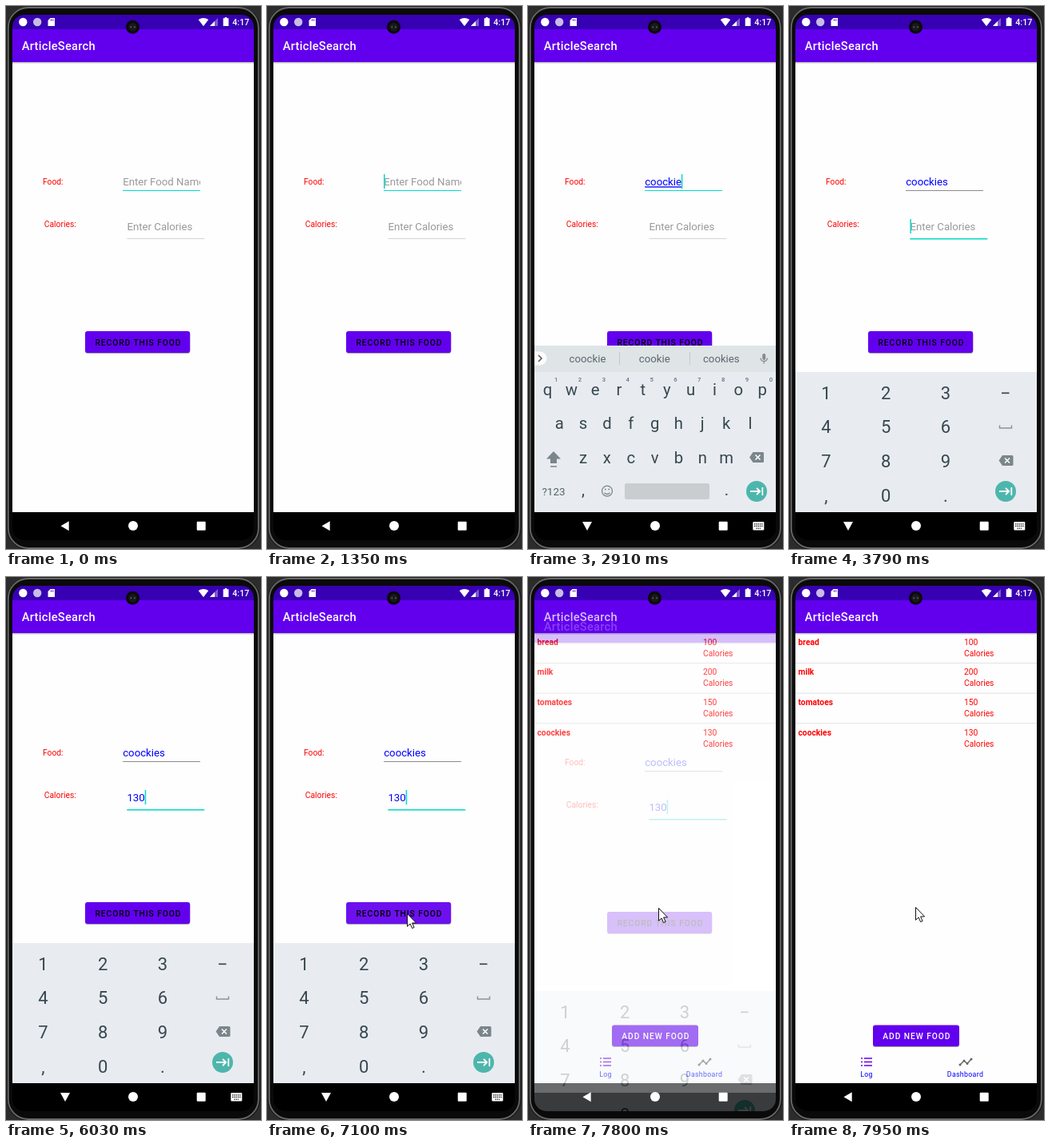
An HTML page for the animation above (8000 ms loop, 319 by 678 pixels).

```html
<!DOCTYPE html>
<html lang="en">
<head>
<meta charset="utf-8">
<title>Food log</title>
<style>
html, body { margin: 0; width: 100%; height: 100%; overflow: hidden; background: #2c2c2c; }
svg { display: block; width: 100vw; height: 100vh; font-family: Roboto, "Noto Sans", sans-serif; }
.label { font-size: 10.29px; fill: #f00; }
.bold { font-weight: 700; }
.input { font-size: 13.23px; fill: #00f; }
.hint { font-size: 13.23px; fill: #999; }
.button { font-size: 10.29px; font-weight: 500; letter-spacing: .92px; }
.raised { filter: drop-shadow(0 1.2px .7px rgba(0,0,0,.35)); }
.tab { font-size: 8.82px; letter-spacing: .3px; fill: #00f; text-anchor: middle; }
.key { font-size: 20.3px; fill: #37474f; text-anchor: middle; }
.digit { font-size: 22px; fill: #37474f; text-anchor: middle; }
.sup { font-size: 7.7px; fill: #67757c; text-anchor: middle; font-weight: 500; }
.word { font-size: 13.23px; fill: #5b676d; text-anchor: middle; }
.small { font-size: 13.5px; fill: #55636a; text-anchor: middle; }
</style>
</head>
<body>
<svg viewBox="0 0 319 678" preserveAspectRatio="none">
  <defs>
    <clipPath id="screen"><rect x="8" y="11" width="302" height="656" rx="15"/></clipPath>
    <clipPath id="page"><rect x="8" y="29" width="302" height="604"/></clipPath>
    <clipPath id="foodBox"><rect x="146" y="205" width="97" height="30"/></clipPath>
    <linearGradient id="shade" x2="0" y2="1">
      <stop stop-color="#000" stop-opacity=".3"/><stop offset="1" stop-color="#000" stop-opacity="0"/>
    </linearGradient>
    <g id="bar">
      <rect x="8" y="29" width="302" height="603" fill="#fefefe"/>
      <rect x="8" y="70" width="302" height="2.5" fill="url(#shade)"/>
      <rect x="8" y="29" width="302" height="41" fill="#6200ee"/>
      <text x="19.8" y="55" font-size="14.7" font-weight="500" letter-spacing=".25" fill="#fff">ArticleSearch</text>
    </g>
    <g id="erase">
      <path d="M-9 0L-4.5-6.5H7.5Q9-6.5 9-5V5Q9 6.5 7.5 6.5H-4.5Z" fill="#7b868c"/>
      <path d="M-1.5-3L4.5 3M4.5-3L-1.5 3" stroke="#fff" stroke-width="1.5"/>
    </g>
    <g id="next">
      <circle r="13" fill="#4db6ac"/>
      <path d="M-8 0H4M0-4.2L4.2 0L0 4.2M7.3-5V5" fill="none" stroke="#fff" stroke-width="1.8"/>
    </g>
  </defs>

  <!-- phone body -->
  <rect x=".5" y=".5" width="318" height="679" rx="28" fill="#1c1c1c"/>
  <rect x="2.8" y="2" width="313" height="675" rx="25" fill="#0a0a0a" stroke="#686868" stroke-width="1.8"/>

  <g clip-path="url(#screen)">
    <rect x="8" y="11" width="302" height="656"/>
    <rect x="8" y="11" width="302" height="22" fill="#3700b3"/>

    <g id="list" clip-path="url(#page)">
      <use href="#bar"/>
      <g id="rows"></g>
      <rect class="raised" x="105" y="559.5" width="108" height="26.5" rx="3" fill="#6200ee"/>
      <text class="button" x="117.3" y="576.8" fill="#fff">ADD NEW FOOD</text>
      <path d="M90 601H92M90 605.5H92M90 610H92M94 601H104M94 605.5H104M94 610H104" stroke="#6200ee" stroke-width="1.6"/>
      <path d="M214 609L219 604L223 607.5L228 602" fill="none" stroke="#666" stroke-width="1.5"/>
      <path d="M214 609h0M219 604h0M223 607.5h0M228 602h0" stroke="#666" stroke-width="3" stroke-linecap="round"/>
      <text class="tab" x="97" y="624.3">Log</text>
      <text class="tab" x="220.5" y="624.3">Dashboard</text>
    </g>

    <g id="form">
      <use href="#bar"/>
      <text class="label" x="46" y="222.6">Food:</text>
      <text class="label" x="47.8" y="275.6">Calories:</text>
      <text class="hint" id="foodHint" x="146.2" y="224.3" clip-path="url(#foodBox)">Enter Food Name</text>
      <text class="input" id="food" x="146.2" y="224.3"></text>
      <rect id="foodLine" x="146" y="230" width="97"/>
      <text class="hint" id="calHint" x="151.4" y="280.3">Enter Calories</text>
      <text class="input" id="cal" x="151.4" y="280.3"></text>
      <rect id="calLine" x="151.3" y="290" width="97"/>
      <rect id="caret" width="1.5" height="18" fill="#03dac5"/>
      <rect class="raised" id="record" x="99" y="406" width="131.2" height="27" rx="3"/>
      <text class="button" x="111.5" y="423.6">RECORD THIS FOOD</text>
    </g>

    <g id="letters">
      <rect x="8" y="424" width="302" height="208" fill="#e8ecf0"/>
      <rect x="8" y="424" width="302" height="33" fill="#dfe4e7"/>
      <path d="M8 431.5H15A8.5 8.5 0 0 1 15 448.5H8Z" fill="#fcfcfc"/>
      <path d="M13 436L17 440L13 444" fill="none" stroke="#555" stroke-width="1.5"/>
      <path d="M114.5 432V448M202.5 432V448" stroke="#c3c9cd"/>
      <text class="word" x="74.5" y="444.6"></text>
      <text class="word" x="158.3" y="444.6"></text>
      <text class="word" x="241.8" y="444.6"></text>
      <rect x="293.2" y="434" width="4" height="8" rx="2" fill="#838c91"/>
      <path d="M291 439.5A4.2 4.2 0 0 0 299.4 439.5M295.2 443.5V446.5" fill="none" stroke="#838c91" stroke-width="1.3"/>
      <path d="M32 556L41 565.5H36V571H28V565.5H23Z" fill="#7b868c"/>
      <path d="M28 575H36" stroke="#7b868c" stroke-width="1.5"/>
      <use href="#erase" x="286" y="563.5"/>
      <text class="small" x="32" y="610.7">?123</text>
      <text class="key" x="69" y="611">,</text>
      <g fill="none" stroke="#7b868c" stroke-width="1.3">
        <circle cx="99" cy="605.7" r="6.5"/><path d="M95.5 607.7Q99 611.2 102.5 607.7"/>
        <path d="M96.8 603.5h.01M101.2 603.5h.01" stroke-width="1.8" stroke-linecap="round"/>
      </g>
      <rect x="121" y="596" width="106" height="20" rx="2.5" fill="#cacdd0"/>
      <text class="key" x="248.5" y="611">.</text>
      <use href="#next" x="286" y="606"/>
    </g>

    <g id="numbers">
      <rect x="8" y="457" width="302" height="175" fill="#e8ecf0"/>
      <path d="M266 483.3H275.5" stroke="#37474f" stroke-width="1.7"/>
      <path d="M263.5 523.5V527H278.5V523.5" fill="none" stroke="#8b959a" stroke-width="1.5"/>
      <use href="#erase" x="271.5" y="567.5"/>
      <use href="#next" x="271" y="606"/>
    </g>

    <!-- navigation -->
    <g fill="#fff">
      <path id="back" d="M68.5 649.3L78.7 643.3V655.3Z"/>
      <path id="down" d="M68 644H80L74 655Z"/>
      <circle cx="159" cy="649" r="6"/>
      <rect x="238.7" y="643.8" width="11" height="11" rx="1"/>
      <g id="switcher">
        <rect x="281.3" y="644" width="14" height="10.5" rx="1"/>
        <path d="M283 646.8H294M283 649.3H294M285.5 652.2H291" stroke="#000" stroke-width="1.2" stroke-dasharray="1.3 1" fill="none"/>
      </g>
    </g>

    <!-- status bar -->
    <g fill="#fff">
      <circle cx="21.3" cy="20" r="5.2"/>
      <circle cx="39.2" cy="20" r="5.2" fill="#c9bce8"/>
      <path d="M55.5 15H61V25H52.5V18Z"/>
      <path d="M56 16.5V18.5M57.6 16.5V18.5M59.2 16.5V18.5" stroke="#3700b3" stroke-width=".8"/>
      <path d="M240.7 17Q247 12.8 253.3 17L247 25.2Z"/>
      <path d="M265 15V25H255Z" opacity=".35"/><path d="M261 19V25H255Z"/>
      <path d="M273.8 14H276.2V15.2H278.5V25H271.7V15.2H273.8Z"/>
      <text x="283.3" y="24" font-size="10.7" font-weight="500">4:17</text>
    </g>
  </g>

  <circle cx="158.5" cy="26.3" r="8.5" fill="#0b0b0d"/>
  <circle cx="158.5" cy="26.3" r="5.2" fill="#19191c"/>
  <circle cx="156.3" cy="26.3" r="1.1" fill="#55555a"/><circle cx="160.9" cy="26.3" r="1.1" fill="#55555a"/>

  <path id="mouse" d="M.5.5V16.3L4.1 13L6.6 18.6L9.1 17.5L6.6 12H11.6Z" fill="#fff" stroke="#111"/>
</svg>

<script>
const LOOP = 8000;
const $ = id => document.getElementById(id);
const words = document.querySelectorAll('.word');
const fields = {
  food: { x: 146, y: 210, idle: '#8c8c8c', weight: 1 },
  cal: { x: 151.4, y: 266, idle: '#d4d4d4', weight: 1.5 }
};

function add(parent, tag, attrs, text = '') {
  const el = document.createElementNS('http://www.w3.org/2000/svg', tag);
  for (const k in attrs) el.setAttribute(k, attrs[k]);
  el.textContent = text;
  $(parent).append(el);
}

[['qwertyuiop', 24.5], ['asdfghjkl', 39.2], ['zxcvbnm', 69]].forEach(([row, x], r) => {
  [...row].forEach((ch, i) => {
    const cx = x + i * 29.85;
    add('letters', 'text', { class: 'key', x: cx, y: 485.5 + r * 42.5 }, ch);
    if (!r) add('letters', 'text', { class: 'sup', x: cx + 10.7, y: 469.3 }, (i + 1) % 10);
  });
});

['123', '456', '789', ',0.'].forEach((row, r) => [...row].forEach((ch, i) =>
  add('numbers', 'text', { class: 'digit', x: 46.4 + i * 74.8, y: 490.8 + r * 42.6 }, ch)));

[['bread', 100], ['milk', 200], ['tomatoes', 150], ['coockies', 130]].forEach(([name, kcal], i) => {
  const y = 84.7 + i * 37.6;
  add('rows', 'text', { class: 'label bold', x: 11.5, y }, name);
  add('rows', 'text', { class: 'label', x: 219, y }, kcal);
  add('rows', 'text', { class: 'label', x: 219, y: y + 14 }, 'Calories');
  if (i < 3) add('rows', 'rect', { x: 8, y: y + 22.3, width: 302, height: 1, fill: '#e2e2e2' });
});

// Each step lists only what changes from the one before.
const steps = [
  [0, { food: '', cal: '', field: 'food', caret: 0, composing: 0, pad: '', rise: 0, solid: 1, words: '',
        keys: 0, mouse: null, tint: '#6200ee', formY: 0, form: 1, list: 0 }],
  [390, { caret: 1 }],
  [980, { caret: 0 }],
  [1350, { caret: 1 }],
  [1780, { food: 'coo', composing: 1, pad: 'letters', keys: 1, rise: 24, solid: .35 }],
  [1900, { food: 'cooc', rise: 13, solid: .8, words: 'cooc cool coocoo' }],
  [2050, { food: 'coock', rise: 0, solid: 1, words: 'coock cook coocoo' }],
  [2610, { food: 'coocki', words: 'coocki cookie cooking' }],
  [2910, { food: 'coockie', words: 'coockie cookie cookies' }],
  [3060, { food: 'coockies', words: "coockies cookies cookie's" }],
  [3490, { caret: 0 }],
  [3790, { field: 'cal', caret: 1, composing: 0, pad: 'numbers' }],
  [4220, { caret: 0 }],
  [4810, { caret: 1 }],
  [5330, { caret: 0 }],
  [5480, { cal: '1', caret: 1 }],
  [5630, { cal: '13' }],
  [6030, { cal: '130' }],
  [6430, { caret: 0 }],
  [6700, { mouse: [213, 458] }],
  [6820, { mouse: [172, 422] }],
  [6970, { mouse: [175, 420], caret: 1 }],
  [7100, { tint: '#6c10ef' }],
  [7380, { mouse: [176, 417], tint: '#7420f0' }],
  [7530, { tint: '#6a0cef' }],
  [7680, { formY: 1, keys: 0, rise: 1 }],
  [7800, { formY: 12, form: .25, list: 1, rise: 60, solid: .25, mouse: [163, 413] }],
  [7950, { form: 0, pad: '', mouse: [158, 412] }]
];
let last = {};
const states = steps.map(([at, change]) => [at, last = { ...last, ...change }]);

const show = (id, on) => $(id).setAttribute('visibility', on ? 'visible' : 'hidden');
const move = (id, x, y) => $(id).setAttribute('transform', `translate(${x} ${y})`);

function drawField(id, s) {
  const { idle, weight } = fields[id];
  const focused = s.field === id;
  $(id).textContent = s[id];
  show(id + 'Hint', !s[id]);
  $(id + 'Line').setAttribute('fill', focused ? '#03dac5' : idle);
  $(id + 'Line').setAttribute('height', focused ? weight : 1);
}

function draw(s) {
  drawField('food', s);
  drawField('cal', s);
  $('food').setAttribute('text-decoration', s.composing ? 'underline' : 'none');

  const { x, y } = fields[s.field];
  const typed = s[s.field] ? $(s.field).getComputedTextLength() : 0;
  $('caret').setAttribute('x', x + typed);
  $('caret').setAttribute('y', y);
  show('caret', s.caret);

  for (const id of ['letters', 'numbers']) {
    show(id, s.pad === id);
    move(id, 0, s.rise);
    $(id).setAttribute('opacity', s.solid);
  }
  const list = s.words.split(' ');
  words.forEach((el, i) => el.textContent = list[i] || '');

  show('back', !s.keys);
  show('down', s.keys);
  show('switcher', s.keys);
  $('record').setAttribute('fill', s.tint);
  $('form').setAttribute('opacity', s.form);
  move('form', 0, s.formY);
  show('list', s.list);
  show('mouse', s.mouse);
  if (s.mouse) move('mouse', ...s.mouse);
}

let shown;
const start = performance.now();
function tick() {
  const t = (performance.now() - start) % LOOP;
  const state = states.findLast(([at]) => at <= t)[1];
  if (state !== shown) draw(shown = state);
  requestAnimationFrame(tick);
}
tick();
</script>
</body>
</html>
```
